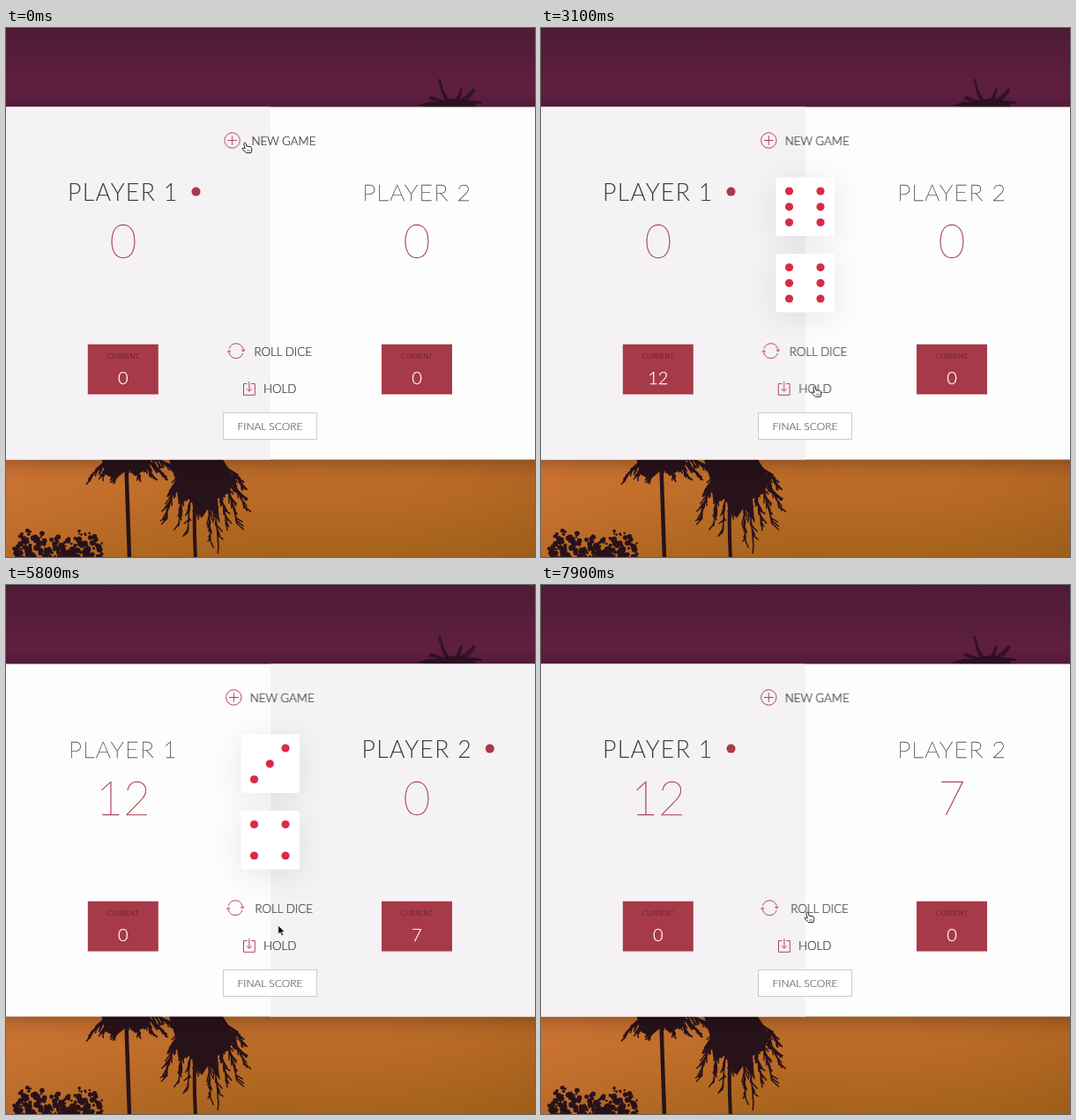
An HTML page that plays this animation: 600x600 px, repeating every 8000 ms.

```html
<!DOCTYPE html>
<html lang="en">
<head>
<meta charset="utf-8">
<title>Dice game</title>
<style>
  html, body { margin: 0; width: 100%; height: 100%; overflow: hidden; }
  body { background: linear-gradient(#4f1b36, #601f41 12%, #571c3b 15%, #b5672a 81.5%, #bd6c27 87%, #a5621b); }
  svg { display: block; width: 600px; height: 600px; font-family: Lato, sans-serif; font-weight: 300; }
  .mid { text-anchor: middle; }
  .name { font-size: 26.67px; letter-spacing: 1.33px; fill: #3c3c3c; }
  .thin, .score { font-weight: 100; stroke-width: .35px; }
  .thin { stroke: #444; }
  .score { font-size: 53.33px; fill: #a33746; stroke: #a33746; }
  .label { font-size: 8px; fill: #431a22; }
  .current { font-size: 20px; fill: #fff; stroke: #fff; stroke-width: .25px; }
  .btn { font-size: 13.33px; fill: #333; stroke: #333; stroke-width: .2px; }
  .final { font-size: 12px; fill: #555; stroke: #555; stroke-width: .15px; }
  .icon { fill: none; stroke: #b04352; stroke-width: 1; }
  .pips { fill: #d92b43; }
  .die { fill: #fff; filter: drop-shadow(0 6px 17px rgba(0, 0, 0, .09)); }

  /* Hard state changes */
  .s { animation: 8s step-end infinite; }
  .turn1 { animation-name: turn1; }
  .turn2 { animation-name: turn2; }
  .roll1 { animation-name: roll1; }
  .rest1 { animation-name: rest1; }
  .roll2 { animation-name: roll2; }
  .rest2 { animation-name: rest2; }
  .early1 { animation-name: early1; }
  .late1 { animation-name: late1; }
  .early2 { animation-name: early2; }
  .late2 { animation-name: late2; }
  .arrow { animation-name: arrow; }
  .hand { animation-name: hand; }
  @keyframes turn1 { 0%, 80%, 100% { opacity: 1 } 42.5% { opacity: 0 } }
  @keyframes turn2 { 0%, 80%, 100% { opacity: 0 } 42.5% { opacity: 1 } }
  @keyframes roll1 { 0%, 42.5%, 100% { opacity: 0 } 18.75% { opacity: 1 } }
  @keyframes rest1 { 0%, 42.5%, 100% { opacity: 1 } 18.75% { opacity: 0 } }
  @keyframes roll2 { 0%, 80%, 100% { opacity: 0 } 60% { opacity: 1 } }
  @keyframes rest2 { 0%, 80%, 100% { opacity: 1 } 60% { opacity: 0 } }
  @keyframes early1 { 0% { opacity: 1 } 42.5%, 100% { opacity: 0 } }
  @keyframes late1 { 0% { opacity: 0 } 42.5%, 100% { opacity: 1 } }
  @keyframes early2 { 0% { opacity: 1 } 80%, 100% { opacity: 0 } }
  @keyframes late2 { 0% { opacity: 0 } 80%, 100% { opacity: 1 } }
  @keyframes arrow {
    0%, 10.25%, 38.25%, 50.5%, 73.4%, 95.5%, 100% { opacity: 0 }
    3.5%, 36.4%, 48.6%, 71%, 93.4% { opacity: 1 }
  }
  @keyframes hand {
    0%, 10.25%, 38.25%, 50.5%, 73.4%, 95.5%, 100% { opacity: 1 }
    3.5%, 36.4%, 48.6%, 71%, 93.4% { opacity: 0 }
  }

  /* Hovering widens the gap between icon and caption */
  .gap { animation: 8s linear infinite; }
  .icon.gap { --d: -1.7px; }
  .btn.gap { --d: 1.7px; }
  .new .gap { animation-name: new; }
  .roll .gap { animation-name: roll; }
  .hold .gap { animation-name: hold; }
  @keyframes new {
    0%, 3.5% { transform: translateX(var(--d)) }
    6.5%, 100% { transform: none }
  }
  @keyframes roll {
    0%, 10.25%, 39.4%, 50.5%, 74%, 95.5% { transform: none }
    13.25%, 36.4%, 53.5%, 71%, 98.5%, 100% { transform: translateX(var(--d)) }
  }
  @keyframes hold {
    0%, 38.25%, 51.6%, 73.4%, 96.4%, 100% { transform: none }
    41.25%, 48.6%, 76.4%, 93.4% { transform: translateX(var(--d)) }
  }

  .cursor { animation: cursor 8s ease-in-out infinite; }
  @keyframes cursor {
    0%, 2.5% { transform: translate(271px, 130px) }
    11.25%, 13.75% { transform: translate(310px, 362px) }
    28.75%, 35% { transform: translate(310px, 363px) }
    40%, 47.5% { transform: translate(310px, 413px) }
    50% { transform: translate(308.5px, 375px) }
    52.5% { transform: translate(308px, 369px) }
    66.25%, 70% { transform: translate(308px, 370px) }
    76%, 92.5% { transform: translate(310px, 414px) }
    96%, 100% { transform: translate(302px, 371px) }
  }
</style>
</head>
<body>
<svg viewBox="0 0 600 600">
  <defs>
    <rect id="die" class="die" width="66.5" height="66.5" rx="3"/>
    <circle id="pip" r="4.6"/>
    <g id="corners">
      <use href="#pip" x="15" y="15.5"/><use href="#pip" x="50.5" y="15.5"/>
      <use href="#pip" x="15" y="51"/><use href="#pip" x="50.5" y="51"/>
    </g>
    <g id="six">
      <use href="#die"/>
      <g class="pips"><use href="#corners"/><use href="#pip" x="15" y="33.3"/><use href="#pip" x="50.5" y="33.3"/></g>
    </g>
    <g id="four"><use href="#die"/><use class="pips" href="#corners"/></g>
    <g id="three">
      <use href="#die"/>
      <g class="pips"><use href="#pip" x="50.5" y="15.5"/><use href="#pip" x="32.8" y="33.3"/><use href="#pip" x="15" y="51"/></g>
    </g>
    <filter id="shade" x="-20%" y="-20%" width="140%" height="140%"><feGaussianBlur stdDeviation="9"/></filter>
    <linearGradient id="glow">
      <stop stop-color="#e8804a" stop-opacity=".3"/><stop offset=".5" stop-color="#d08030" stop-opacity="0"/>
      <stop offset="1" stop-color="#7a4a10" stop-opacity=".2"/>
    </linearGradient>
  </defs>

  <rect y="489" width="600" height="111" fill="url(#glow)"/>
  <g stroke-linecap="round" fill="#28121a" stroke="#28121a">
    <path id="leaves" fill="none" stroke-width="1.5"/>
    <path fill="none" stroke-width="4.5" d="M136 485Q138 540 140 602"/>
    <path fill="none" stroke-width="4" d="M216 500Q212 550 215 602"/>
    <path stroke="none" d="M108 486H166L160 500L146 508L138 500L124 512L112 506ZM184 486H244L260 512L252 528L240 534L242 560L230 544L222 556L208 534L196 540L192 512Z"/>
    <g id="bush" stroke="none"/>
  </g>
  <g stroke-linecap="round" fill="#2c1122" stroke="#2c1122">
    <path id="top" fill="none" stroke-width="1"/>
    <path stroke="none" d="M470 92L478 86L490 85L499 81L514 80L523 82L530 86L537 92Z"/>
  </g>

  <rect x="-33" y="94" width="666" height="398" opacity=".25" filter="url(#shade)"/>
  <rect y="89.5" width="600" height="400" fill="#fefdfe"/>
  <rect class="s turn1" y="89.5" width="300" height="400" fill="#f4f2f5"/>
  <rect class="s turn2" x="300" y="89.5" width="300" height="400" fill="#f4f2f5"/>

  <g class="mid">
    <g class="s turn1">
      <text class="name" x="132.8" y="195.8">PLAYER 1</text>
      <text class="name thin" x="466.3" y="195.8">PLAYER 2</text>
      <circle cx="215.5" cy="185.6" r="5" fill="#a63a48"/>
    </g>
    <g class="s turn2">
      <text class="name thin" x="132.8" y="195.8">PLAYER 1</text>
      <text class="name" x="466.3" y="195.8">PLAYER 2</text>
      <circle cx="548.8" cy="185.6" r="5" fill="#a63a48"/>
    </g>

    <g class="score">
      <text class="s early1" x="133" y="261">0</text>
      <text class="s late1" x="133" y="261">12</text>
      <text class="s early2" x="466" y="261">0</text>
      <text class="s late2" x="466" y="261">7</text>
    </g>

    <path fill="#a63a48" d="M92.8 358.8h80v56.6h-80zM426 358.8h80v56.6h-80z"/>
    <text class="label" x="132.8" y="374.6">CURRENT</text>
    <text class="label" x="466" y="374.6">CURRENT</text>
    <g class="current">
      <text class="s rest1" x="132.8" y="403.5">0</text>
      <text class="s roll1" x="132.8" y="403.5">12</text>
      <text class="s rest2" x="466" y="403.5">0</text>
      <text class="s roll2" x="466" y="403.5">7</text>
    </g>
  </g>

  <g class="s roll1"><use href="#six" x="266.5" y="169.5"/><use href="#six" x="266.5" y="256"/></g>
  <g class="s roll2"><use href="#three" x="266.5" y="169.5"/><use href="#four" x="266.5" y="256"/></g>

  <g class="new">
    <path class="icon gap" d="M249.6 127.5a8.7 8.7 0 1 0 17.4 0a8.7 8.7 0 1 0-17.4 0M253 127.5h10.6M258.3 122.2v10.6"/>
    <text class="btn gap" x="276.7" y="132.7">NEW GAME</text>
  </g>
  <g class="roll">
    <path class="icon gap" d="M253.2 363.5A8.2 8.2 0 0 1 269.2 366.5M268.8 369A8.2 8.2 0 0 1 252.8 366M251 367.8L252.8 365.6L255 367.4M267 365L269.2 366.9L271 364.7"/>
    <text class="btn gap" x="281.4" y="371.5">ROLL DICE</text>
  </g>
  <g class="hold">
    <path class="icon gap" d="M273.5 403.5H269.5V416.3H282.3V403.5H278.3M275.9 401V412M272.9 409.2L275.9 412.2L278.9 409.2"/>
    <text class="btn gap" x="292" y="414">HOLD</text>
  </g>

  <rect x="246.5" y="436.5" width="106" height="30" fill="#fff" stroke="#cdcbce"/>
  <text class="final mid" x="299.5" y="456">FINAL SCORE</text>

  <g class="cursor" stroke-linejoin="round">
    <path class="s arrow" fill="#000" stroke="#fff" stroke-width=".7" d="M0 0V10L2.3 8L4 11.8L5.8 11L4.2 7.4H7.3Z"/>
    <g class="s hand" fill="#fff" stroke="#222" stroke-width="1">
      <path d="M-1.3 1.3A1.2 1.2 0 0 1 1 .8L2 4.2L6 4.6Q7.8 5 7.8 7.4L7 11.6H1.6L-2.9 7.6Q-3.4 6 -1.8 6.1L.2 7Z"/>
      <path fill="none" stroke-width=".7" d="M3 8v2M5 8v2"/>
    </g>
  </g>
</svg>
<script>
  let seed = 7;
  const rand = () => (seed = seed * 16807 % 2147483647) / 2147483647;

  // A curved rib with leaflets sweeping outwards and down
  function frond(x, y, dx, dy, lift, hang) {
    let d = `M${x} ${y}q${dx * .7} ${dy * .15 - lift} ${dx} ${dy}`;
    for (let i = 4; i <= 40; i++) {
      const t = i / 40, u = 2 * t * (1 - t);
      const px = x + u * dx * .7 + t * t * dx;
      const py = y + u * (dy * .15 - lift) + t * t * dy;
      const len = hang * (.5 + rand()) * (1.2 - t * .9);
      d += `M${px} ${py}l${dx * .1 + (rand() - .5) * hang * .5} ${len}`;
    }
    return d;
  }
  const crown = (x, y, lift, hang, ends) =>
    ends.map(([dx, dy]) => frond(x, y, dx, dy, lift, hang)).join('');
  const draw = (id, d) => document.getElementById(id).setAttribute('d', d);

  draw('leaves',
    crown(136, 484, 2, 12, [[-40, 28], [-26, 24], [-14, 30], [14, 26], [30, 24], [52, 14], [44, 26]]) +
    crown(220, 490, 3, 17, [[-39, 68], [-32, 38], [-24, 72], [-14, 82], [-4, 60], [12, 92], [21, 98], [30, 72], [42, 72], [50, 52], [48, 28]]));
  draw('top', crown(506, 86, 4, 4, [[-34, 1], [-24, -8], [-14, -28], [10, -17], [24, -17], [30, -2]]));

  let dots = '';
  for (let i = 0; i < 200; i++) {
    const x = 9 + rand() * 100;
    const top = 569 - 6 * Math.cos((x - 32) / 9.5) + Math.max(0, 20 - x) * .4;
    const y = top + Math.sqrt(rand()) * (602 - top);
    dots += `<circle cx="${x}" cy="${y}" r="${1 + rand() * 2.4}"/>`;
  }
  document.getElementById('bush').innerHTML = dots;
</script>
</body>
</html>
```
